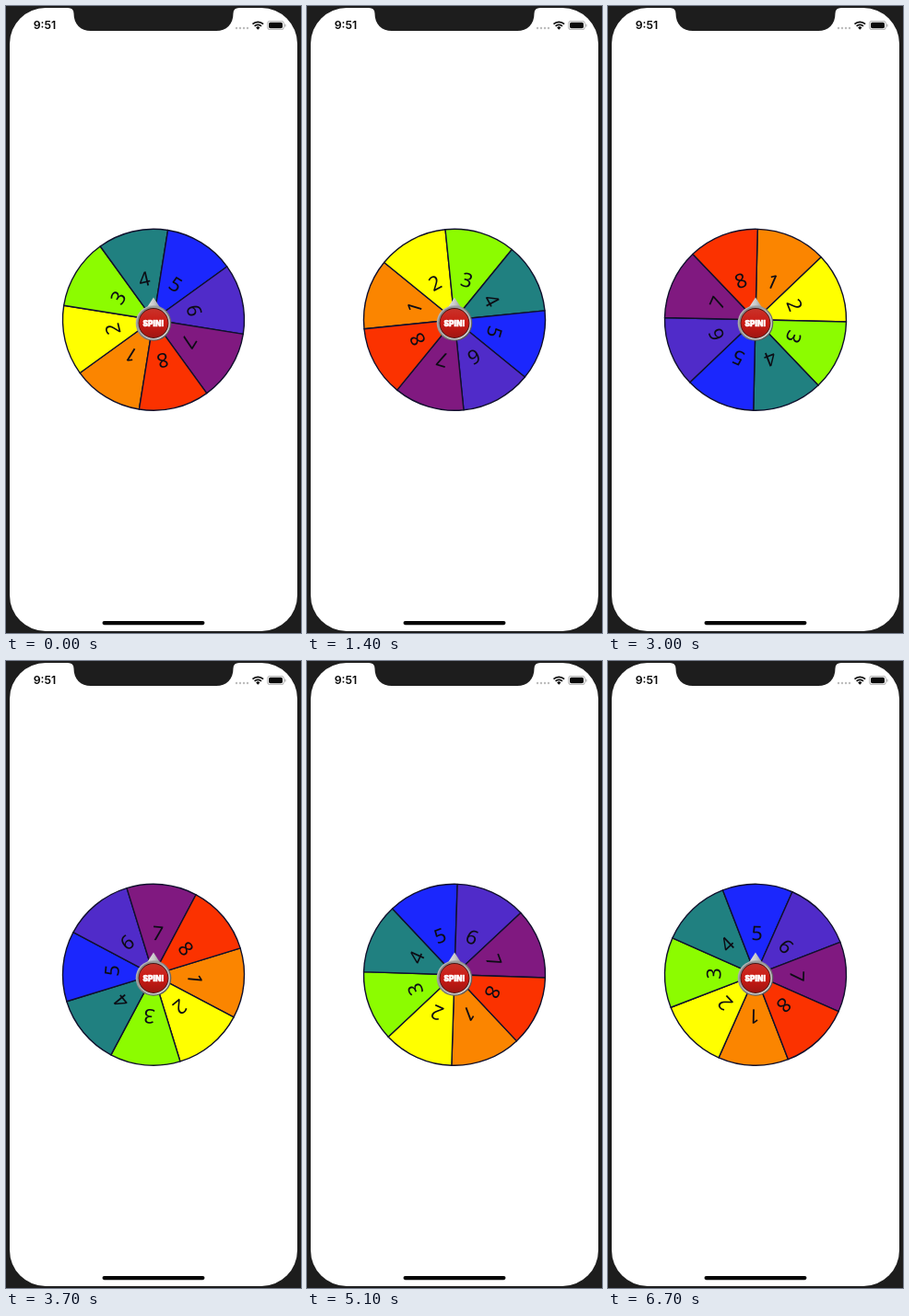
Recreate the animation shown at these times as an HTML page with a canvas. Size 320 by 681 pixels, loop 6800 ms.

```html
<!DOCTYPE html>
<html lang="en">
<head>
<meta charset="utf-8">
<title>Spinning wheel</title>
<style>
  html, body { margin: 0; width: 100%; height: 100%; overflow: hidden; background: #1d1d1d; }
  canvas { display: block; width: 320px; height: 681px; }
</style>
</head>
<body>
<canvas id="stage"></canvas>
<script>
const W = 320, H = 681, LOOP = 6800, STEP = 100, TAU = Math.PI * 2;
const SHELL = '#1d1d1d';
const COLORS = ['#fb8500', '#ffff00', '#8cfc00', '#208080', '#1b27fd', '#502bc9', '#801980', '#fb3200'];
const WHEEL = { x: 160, y: 340.8, r: 98.5 };
const HUB = { x: 160, y: 344.5 };

const canvas = document.getElementById('stage');
const ctx = canvas.getContext('2d');
const dpr = window.devicePixelRatio || 1;
canvas.width = W * dpr;
canvas.height = H * dpr;

// The wheel coasts to REST; knots hold [seconds, degrees still to turn].
const REST = 189.7;
const knots = [
  [0, 2138.1], [1.4, 623], [2.2, 318], [3, 165.9],
  [4.4, 53.6], [5.8, 17.2], [6.7, 8.3]
].map(([t, left]) => [t, Math.log(left)]);

const slope = (a, b) => (b[1] - a[1]) / (b[0] - a[0]);

function tangent(i) {
  const last = knots.length - 1;
  if (i === 0) return slope(knots[0], knots[1]) - 0.025;
  if (i === last) return slope(knots[last - 1], knots[last]);
  return (slope(knots[i - 1], knots[i]) + slope(knots[i], knots[i + 1])) / 2;
}

// Nearly exponential decay: Hermite curve through the logarithms.
function wheelAngle(t) {
  let i = 0;
  while (i < knots.length - 2 && t > knots[i + 1][0]) i++;
  const [t0, y0] = knots[i], [t1, y1] = knots[i + 1];
  const h = t1 - t0, u = (t - t0) / h, v = 1 - u;
  const y = y0 * (1 + 2 * u) * v * v + h * tangent(i) * u * v * v
          + y1 * u * u * (3 - 2 * u) - h * tangent(i + 1) * u * u * v;
  return (REST - Math.exp(y)) * Math.PI / 180;
}

function disc(x, y, r, fill) {
  ctx.beginPath();
  ctx.arc(x, y, r, 0, TAU);
  ctx.fillStyle = fill;
  ctx.fill();
}

function box(x, y, w, h, r, fill) {
  ctx.beginPath();
  ctx.roundRect(x, y, w, h, r);
  ctx.fillStyle = fill;
  ctx.fill();
}

function label(text, x, y, font, fill, align = 'center') {
  ctx.font = font;
  ctx.textAlign = align;
  ctx.textBaseline = 'alphabetic';
  ctx.fillStyle = fill;
  ctx.fillText(text, x, y);
}

function gradient(x0, y0, x1, y1, ...stops) {
  const g = ctx.createLinearGradient(x0, y0, x1, y1);
  stops.forEach((c, i) => g.addColorStop(i / (stops.length - 1), c));
  return g;
}

function drawNotch() {
  ctx.beginPath();
  ctx.moveTo(67, 0);
  ctx.lineTo(67, 2);
  ctx.quadraticCurveTo(73.5, 2, 73.5, 8);
  ctx.bezierCurveTo(73.5, 20, 81, 27, 92, 27);
  ctx.lineTo(228, 27);
  ctx.bezierCurveTo(239, 27, 246.5, 20, 246.5, 8);
  ctx.quadraticCurveTo(246.5, 2, 253, 2);
  ctx.lineTo(253, 0);
  ctx.fillStyle = SHELL;
  ctx.fill();
}

function drawStatus() {
  label('9:51', 29.7, 25.3, '600 12.3px Inter, Roboto, sans-serif', '#0a0a0a', 'left');
  for (let i = 0; i < 4; i++) disc(250 + i * 4, 24, 1.2, '#bdbdbd');

  // Wi-Fi: two arcs over a wedge
  ctx.strokeStyle = '#0a0a0a';
  ctx.lineWidth = 1.7;
  for (const r of [8.2, 5.2]) {
    ctx.beginPath();
    ctx.arc(273.3, 25.5, r, -Math.PI * 0.75, -Math.PI * 0.25);
    ctx.stroke();
  }
  ctx.beginPath();
  ctx.moveTo(273.3, 25.8);
  ctx.arc(273.3, 25.5, 3, -Math.PI * 0.75, -Math.PI * 0.25);
  ctx.fillStyle = '#0a0a0a';
  ctx.fill();

  box(283.3, 16, 18.4, 10, 3, '#a9a9a9');
  box(284.1, 16.8, 16.8, 8.4, 2.4, '#fff');
  box(285, 17.7, 15, 6.6, 1.7, '#0a0a0a');
  box(302.3, 19.5, 1.2, 3.2, 0.6, '#a9a9a9');
}

function drawPhone() {
  ctx.fillStyle = SHELL;
  ctx.fillRect(0, 0, W, H);
  box(4, 2, 312, 677, 39, '#fff');
  drawNotch();
  drawStatus();
  box(104.5, 668, 111, 4.2, 2.1, '#050505');
}

function drawWheel(angle) {
  const part = TAU / COLORS.length;
  ctx.save();
  ctx.translate(WHEEL.x, WHEEL.y);
  ctx.rotate(angle);
  ctx.strokeStyle = '#10102c';
  ctx.lineWidth = 1.4;
  ctx.lineJoin = 'round';
  COLORS.forEach((color, i) => {
    ctx.save();
    ctx.rotate(i * part);
    ctx.beginPath();
    ctx.moveTo(0, 0);
    ctx.arc(0, 0, WHEEL.r, -Math.PI / 2 - part / 2, -Math.PI / 2 + part / 2);
    ctx.closePath();
    ctx.fillStyle = color;
    ctx.fill();
    ctx.stroke();
    label(i + 1, 0.4, -37.6, '21.5px "Noto Sans", "Open Sans", sans-serif', '#0c0c14');
    ctx.restore();
  });
  ctx.restore();
}

function drawHub() {
  const { x, y } = HUB;
  ctx.beginPath();
  ctx.moveTo(x, y - 28);
  ctx.lineTo(x + 8.4, y - 15);
  ctx.lineTo(x - 8.4, y - 15);
  ctx.closePath();
  ctx.fillStyle = gradient(x - 8, 0, x + 8, 0, '#e6e6e6', '#cccccc', '#969696');
  ctx.fill();

  disc(x, y, 19.3, gradient(x - 14, y - 14, x + 14, y + 14, '#bdbdbd', '#7d7d7d', '#555555'));
  disc(x, y, 18, gradient(x - 13, y - 13, x + 13, y + 13, '#858585', '#b4b4b4', '#d2d2d2'));
  disc(x, y, 16.4, '#4a1513');
  disc(x, y, 15.6, gradient(0, y - 16, 0, y + 16, '#c9332a', '#cb1a14', '#9e1511'));

  const font = '900 8.3px Inter, Roboto, sans-serif';
  ctx.font = font;
  ctx.textAlign = 'center';
  ctx.lineJoin = 'round';
  ctx.lineWidth = 0.6;
  ctx.strokeStyle = '#fff';
  ctx.strokeText('SPIN!', x, y + 3.4);
  label('SPIN!', x, y + 3.4, font, '#fff');
}

function frame(now) {
  const t = Math.floor((now % LOOP) / STEP) * STEP / 1000;
  ctx.setTransform(dpr, 0, 0, dpr, 0, 0);
  drawPhone();
  drawWheel(wheelAngle(t));
  drawHub();
  requestAnimationFrame(() => frame(performance.now() - start));
}

const start = performance.now();
frame(0);
</script>
</body>
</html>
```
